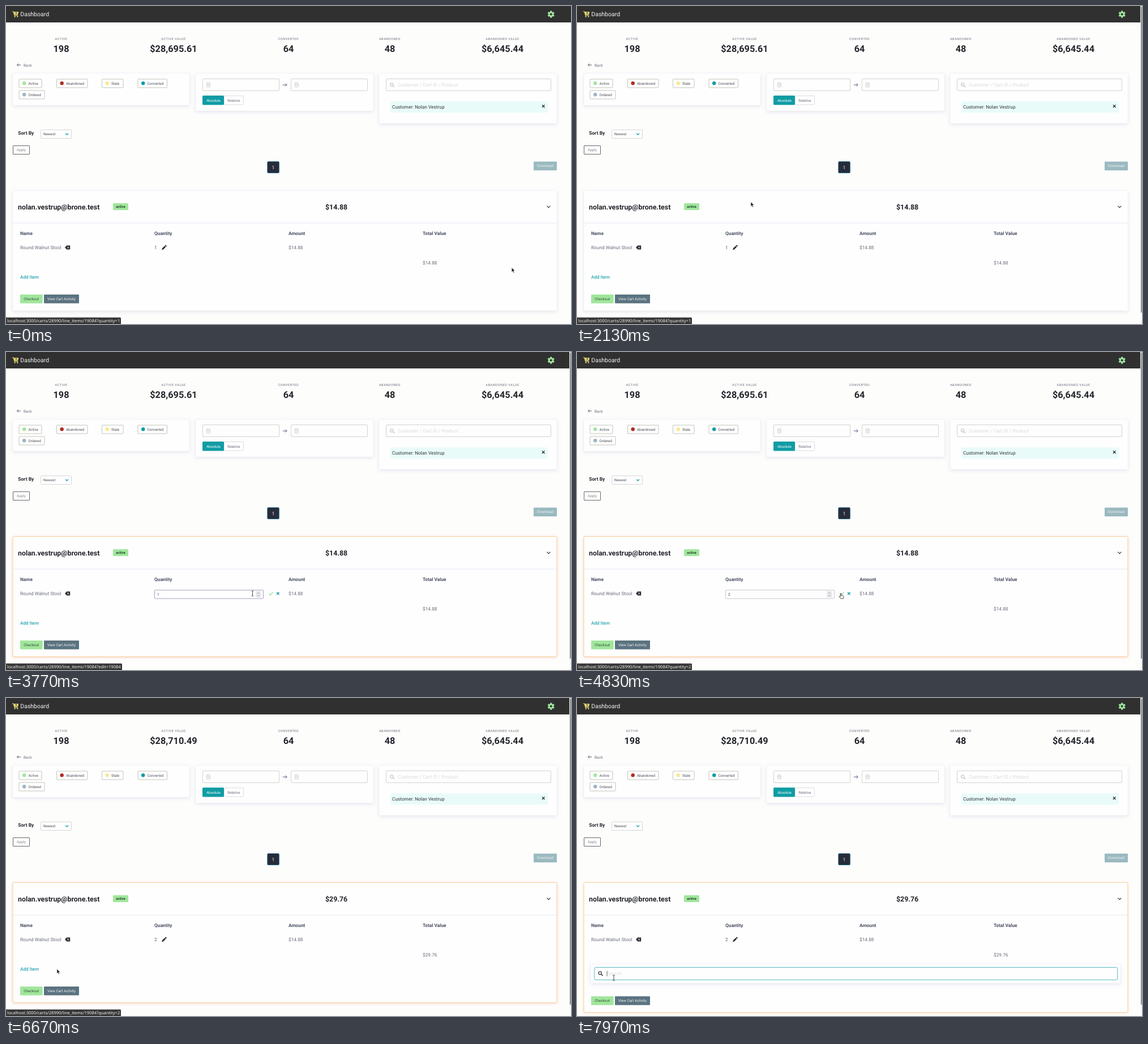
Write an HTML page that moves like this. It is 998x561 px and loops after 8 s.

```html
<!DOCTYPE html>
<html lang="en">
<head>
<meta charset="utf-8">
<title>Dashboard</title>
<style>
html, body { margin: 0; width: 100%; height: 100%; overflow: hidden; background: #fdfdfc; }
svg { display: block; width: 100%; height: 100%; }
text { font-family: Roboto, sans-serif; text-rendering: geometricPrecision; white-space: pre; }
.status { font-family: "Noto Sans", sans-serif; }
.card { filter: drop-shadow(0 2px 3px rgba(80, 70, 150, .13)); }
</style>
</head>
<body>
<svg id="stage" viewBox="0 0 998 561"></svg>
<script>
const LOOP = 8000;
const TEAL = '#109ca4', GREEN = '#a0e69c', SLATE = '#5b7380', INK = '#23252b', GREY = '#686d7c';

const rect = (x, y, w, h, fill, stroke = 'none', r = 1.5, extra = '') =>
  `<rect x="${x}" y="${y}" width="${w}" height="${h}" rx="${r}" fill="${fill}" stroke="${stroke}" ${extra}/>`;
const text = (x, y, size, fill, label, extra = '') =>
  `<text x="${x}" y="${y}" font-size="${size}" fill="${fill}" ${extra}>${label}</text>`;
const line = (d, stroke, width = 1, extra = '') =>
  `<path d="${d}" fill="none" stroke="${stroke}" stroke-width="${width}" ${extra}/>`;
const shape = (d, fill, extra = '') => `<path d="${d}" fill="${fill}" ${extra}/>`;
const group = (id, body, extra = '') => `<g id="${id}" ${extra}>${body}</g>`;
const BOLD = 'font-weight="700"', MID = 'text-anchor="middle"';

const card = (x, y, w, h) => rect(x, y, w, h, '#fefefe', '#f1f1f5', 2, 'class="card" stroke-width=".6"');

const cross = (x, y, r, color, width) =>
  line(`M${x - r} ${y - r}l${2 * r} ${2 * r}m0 ${-2 * r}l${-2 * r} ${2 * r}`, color, width);

const lens = (x, y, color) =>
  `<circle cx="${x - .8}" cy="${y - .8}" r="2.6" fill="none" stroke="${color}" stroke-width="1.2"/>` +
  line(`M${x + 1.2} ${y + 1.2}l2.8 2.8`, color, 1.5);

const calendar = x =>
  rect(x - 3, 136, 6, 7, 'none', '#cfcfcf', .7) +
  line(`M${x - 3} 138.5h6M${x - 1.5} 134.5v2M${x + 1.5} 134.5v2M${x - 1.5} 140.7h3`, '#cfcfcf');

const stat = (x, label, value, id) =>
  text(x, 60.2, 5.7, '#6b6f7c', label, MID + ' letter-spacing=".5"') +
  text(x, 80.7, 16.3, INK, value, `${MID} ${BOLD} id="${id}"`);

const filter = (x, y, w, color, label) =>
  rect(x + .5, y + .5, w - 1, 15, '#fefefe', '#c4c5ba', 1) +
  `<circle cx="${x + 9.7}" cy="${y + 7.8}" r="3.2" fill="${color}"/>` +
  text(x + 17, y + 10.2, 6.3, '#4a4d55', label);

function gear(x, y) {
  let teeth = '';
  for (let a = 0; a < 360; a += 60)
    teeth += rect(x - 1.6, y - 6.2, 3.2, 4, GREEN, 'none', .6, `transform="rotate(${a} ${x} ${y})"`);
  return teeth + `<circle cx="${x}" cy="${y}" r="3.3" fill="none" stroke="${GREEN}" stroke-width="2.5"/>`;
}

const header =
  rect(0, 0, 998, 29, '#303031', 'none', 0) +
  line('M11 10h2.3l1.7 6.4h6.2', '#f4e678', 1.2) +
  shape('M13.8 10.3h8.4l-1.2 4.7h-6z', '#f4e678') +
  line('M18 10.8v3.2M16.4 12.4h3.2', '#303031', .9) +
  '<g fill="#f4e678"><circle cx="15.7" cy="18.6" r="1.2"/><circle cx="20.2" cy="18.6" r="1.2"/></g>' +
  text(25.3, 18.3, 10.5, '#f4f4f4', 'Dashboard') + gear(962.7, 14.6);

const stats =
  stat(97.5, 'ACTIVE', '198', 'count') + stat(296, 'ACTIVE VALUE', '', 'activeValue') +
  stat(499, 'CONVERTED', '64', 'converted') + stat(678, 'ABANDONED', '48', 'abandoned') +
  stat(877, 'ABANDONED VALUE', '$6,645.44', 'abandonedValue');

const filters =
  line('M26 104h-6.5m2.6-2.4l-2.6 2.4l2.6 2.4', '#4c5060', .9) + text(31, 106.5, 6.6, GREY, 'Back') +
  card(12, 119, 312, 56) +
  filter(22.5, 128.5, 41, '#a3e5a0', 'Active') + filter(89, 128.5, 55.5, '#b32a21', 'Abandoned') +
  filter(169, 128.5, 38.5, '#fae98e', 'Stale') + filter(232.5, 128.5, 52.5, TEAL, 'Converted') +
  filter(22.5, 148.5, 46, '#9db6c3', 'Ordered') +
  card(335, 119, 314, 66) +
  rect(347.5, 128.5, 135, 21, '#fefefe', '#d3d3cd') + calendar(357.3) +
  rect(503.5, 128.5, 135, 21, '#fefefe', '#d3d3cd') + calendar(513.3) +
  line('M488.8 139.2h7.4m-2.8-2.6l2.8 2.6l-2.8 2.6', '#4c5078', .9) +
  rect(385, 158.5, 34.5, 15.5, '#fefefe', '#dddde2') + rect(347, 158, 38, 16.5, TEAL) +
  text(354, 168.5, 6.3, '#fff', 'Absolute') + text(391.3, 168.5, 6.3, GREY, 'Relative') +
  card(659, 119, 314, 88) +
  rect(671.5, 128.5, 291, 21, '#fefefe', '#d3d3cd') + lens(682, 139.3, '#c9c9c9') +
  text(692.3, 142.2, 8.35, '#d9dadc', 'Customer / Cart ID / Product') +
  rect(679, 168.5, 278, 19.5, '#e9fbf9', 'none', 1) +
  text(682, 181.2, 8.3, '#30333a', 'Customer: Nolan Vestrup') + cross(949.2, 176.7, 2.3, '#222', 1.2);

const sorting =
  text(21.3, 227.2, 8.5, INK, 'Sort By', BOLD) +
  rect(61.5, 218.5, 54, 15, '#fefefe', '#d6d6d6', 1) + text(66, 228.4, 6.3, '#4a4d55', 'Newest') +
  line('M105.2 224.7l2.4 2.4l2.4-2.4', TEAL, 1.3) +
  rect(12.5, 246.5, 29, 15, '#fefefe', '#686868', .5) + text(19, 256.4, 6.4, '#85878e', 'Apply') +
  rect(461.8, 274.5, 20.5, 20, '#282b39', '#246e88') +
  text(472, 287.7, 8.5, '#e9ecf2', '1', MID) +
  rect(932, 274.5, 41, 15.5, '#9ab9bf', 'none', 1) + text(938, 284.3, 6.5, '#edf4f4', 'Download');

const column = (x, label) => text(x, 403.6, 8.3, '#4b5064', label, BOLD);
const cart =
  rect(12, 325.5, 961, 212, '#fefefe', '#f1f1f5', 2, 'id="cartCard" class="card" stroke-width=".6"') +
  rect(12, 325.5, 961, 212, 'none', '#f8d299', 2, 'id="cartHover"') +
  line('M12.5 383h960', '#e4e5f5', .9) +
  text(21, 358.5, 12.4, INK, 'nolan.vestrup@brone.test', BOLD) +
  rect(189, 348, 27, 12, GREEN) + text(202.5, 356.3, 6.2, '#27442d', 'active', `${MID} ${BOLD}`) +
  text(564, 358.5, 12.4, INK, '', `id="cartValue" ${BOLD}`) +
  line('M955.4 352.6l3 3l3-3', '#333', 1.1) +
  column(25, 'Name') + column(262, 'Quantity') + column(499, 'Amount') + column(736, 'Total Value') +
  text(25, 428.8, 8.3, GREY, 'Round Walnut Stool') +
  shape('M104 426l3.2-3.6h6v7.2h-6z', '#2b2d33') + cross(109.6, 426, 1.4, '#fff', .9) +
  text(499, 428.8, 8.3, GREY, '$14.88') + text(736, 455.6, 8.3, GREY, '', 'id="total"');

const quantityView =
  text(262, 428.8, 8.3, '#5c6278', '', 'id="quantity"') +
  shape('M275.2 430.2l.6-2.6l4.3-4.3l2 2l-4.3 4.3zM280.6 422.8l1.1-1q.6-.4 1.1.1l.7.7q.5.5 0 1.1l-1 1z', '#2b2d33');

const quantityForm =
  rect(262.5, 420, 192, 15, '#fefefe', '#bcbcca', .8, 'id="field"') +
  text(267, 430, 6.4, '#3b3e48', '', 'id="fieldValue"') +
  rect(441.8, 422.5, 8, 10, '#efeff1', '#d0d0d8', 1, 'stroke-width=".6"') +
  line('M444 426.3l1.8-1.8l1.8 1.8M444 428.8l1.8 1.8l1.8-1.8', '#66697a', .8) +
  line('M464.4 426.4l2.4 2.4l4.8-5', '#9fdc9c', 1.3) + cross(480.3, 426, 2.3, '#1e9aab', 1.4);

const searchForm =
  card(24, 470, 936, 33) +
  rect(31, 475.5, 923.5, 21.5, '#fefefe', '#8fcdd2', 2, 'id="searchField"') +
  lens(41.5, 486, '#30333a') + text(53.5, 489.2, 8.3, '#dcdde0', 'Search') +
  line('M53 481.5v9.5', '#444', .8, 'id="caret"');

const actions =
  rect(25, 509, 39.7, 15.5, GREEN, 'none', 1) + text(31.2, 519.1, 6.4, '#33503a', 'Checkout') +
  rect(67, 509, 62, 15.5, SLATE, 'none', 1) + text(73, 519.1, 6.4, '#f2f5f6', 'View Cart Activity');

const pointers =
  group('arrow', shape('M0 0v8.2l1.9-1.8l1.3 3l1.4-.6l-1.3-2.9h2.5z', '#1b1b1b', 'stroke="#fff" stroke-width=".6"')) +
  group('hand', shape('M-.8 .4q.8-1 1.5 0v3.4l3.4 .7q.9.3.8 1.2l-.7 3.8h-4.4l-3-3.7q.2-1.2 1.3-.6l1.1.9z', '#fff', 'stroke="#222" stroke-width=".8"')) +
  group('beam', line('M-1.8-4.5h1.2l.6.5l.6-.5h1.2M0-4v8M-1.8 4.5h1.2l.6-.5l.6.5h1.2', '#333', .9));

document.getElementById('stage').innerHTML =
  rect(0, 0, 998, 561, '#fdfdfc', 'none', 0) + header + stats + filters + sorting + cart +
  group('quantityView', quantityView) + group('quantityForm', quantityForm) +
  text(25, 480.6, 8.15, '#27a5ae', 'Add Item', 'id="addItem" font-weight="500"') +
  group('searchForm', searchForm) + group('actions', actions) +
  group('scrollbar', rect(995, 0, 3, 561, '#f7f7f7', 'none', 0) + rect(996, 1, 1.6, 540, '#777', 'none', .8)) +
  group('status', rect(-2, 549.5, 205, 14, '#363637', 'none', 1.5, 'id="statusBox"') +
    text(2, 558.2, 7.52, '#f2f2f2', '', 'id="statusText" class="status"')) +
  group('pointer', pointers);

const el = {};
document.querySelectorAll('[id]').forEach(node => el[node.id] = node);

// Pointer hotspot: time, x, y
const PATH = [
  [0, 893.5, 461.5], [830, 354, 277], [1700, 350, 282], [2130, 307, 345.5], [2540, 279, 425],
  [3300, 280, 425], [3770, 435.5, 426], [3950, 446, 425], [4200, 446, 425], [4500, 466, 425.5],
  [5930, 467, 426], [6670, 90, 478], [6900, 48, 477], [7500, 48, 479], [7970, 65, 493.7]
];
const POINTERS = [[0, 'arrow'], [2540, 'hand'], [3000, 'beam'], [3850, 'arrow'], [4400, 'hand'],
  [5500, 'arrow'], [6850, 'hand'], [7350, 'beam']];
const STATUS = [[0, 'quantity=1'], [2560, 'edit=19084'], [4400, 'quantity=2'], [7650, '']];

const stepAt = (table, t) => table.filter(row => row[0] <= t).pop()[1];
const ramp = (t, from, to) => Math.min(1, Math.max(0, (t - from) / (to - from)));
const show = (node, on) => node.setAttribute('visibility', on ? 'visible' : 'hidden');
const write = (node, value) => { if (node.textContent !== value) node.textContent = value; };

function pointerAt(t) {
  const next = PATH.findIndex(point => point[0] > t);
  if (next < 0) return PATH[PATH.length - 1].slice(1);
  const [t0, x0, y0] = PATH[next - 1], [t1, x1, y1] = PATH[next];
  const p = ramp(t, t0, t1), k = (p + p * p * (3 - 2 * p)) / 2;
  return [x0 + (x1 - x0) * k, y0 + (y1 - y0) * k];
}

function draw(t) {
  const saved = t >= 5500, editing = t >= 3000 && !saved, adding = t >= 7350;
  write(el.activeValue, saved ? '$28,710.49' : '$28,695.61');
  write(el.cartValue, saved ? '$29.76' : '$14.88');
  write(el.total, saved ? '$29.76' : '$14.88');
  write(el.quantity, saved ? '2' : '1');
  write(el.fieldValue, t >= 4080 ? '2' : '1');
  show(el.quantityView, !editing);
  show(el.quantityForm, editing);
  el.field.setAttribute('stroke', t < 4300 ? '#a5a3bd' : '#c6c6d0');

  show(el.addItem, !adding);
  show(el.searchForm, adding);
  show(el.caret, t >= 7600);
  const focused = t >= 7600;
  el.searchField.setAttribute('stroke', focused ? '#72c2c9' : '#d3d3cd');
  el.searchField.style.filter = focused ? 'drop-shadow(0 0 1.5px rgba(60,180,190,.4))' : 'none';
  el.actions.setAttribute('transform', `translate(0 ${adding ? 17.3 : 0})`);
  for (const box of [el.cartCard, el.cartHover]) box.setAttribute('height', adding ? 229.3 : 212);

  el.cartHover.setAttribute('opacity', ramp(t, 2200, 2420));
  const glow = .28 * ramp(t, 2200, 2420);
  el.cartCard.style.filter = glow
    ? `drop-shadow(0 1.5px 2.5px rgba(${adding ? '240,180,90' : '245,100,80'},${glow}))` : '';
  show(el.scrollbar, t >= 1740);

  const query = stepAt(STATUS, t);
  show(el.status, query);
  write(el.statusText, 'localhost:3000/carts/28990/line_items/19084?' + query);
  el.statusBox.setAttribute('width', query.startsWith('edit') ? 207 : 205);

  const kind = stepAt(POINTERS, t);
  for (const name of ['arrow', 'hand', 'beam']) show(el[name], name === kind);
  el.pointer.setAttribute('transform', `translate(${pointerAt(t)})`);
}

const start = performance.now();
function tick() {
  draw((performance.now() - start) % LOOP);
  requestAnimationFrame(tick);
}
tick();
</script>
</body>
</html>
```
